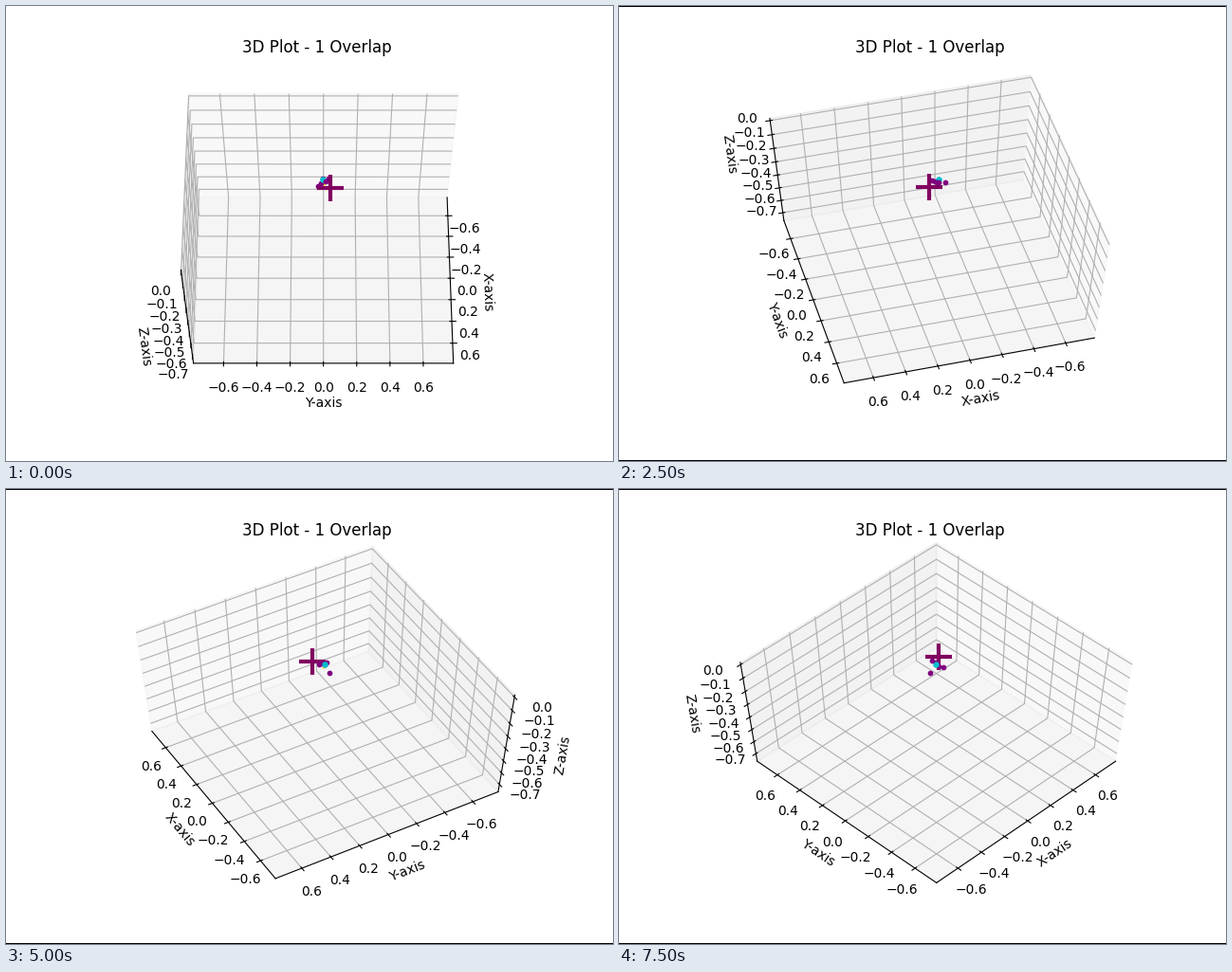
Recreate the animation shown at these times as a matplotlib script. Size 640 px wide and 480 px high, loop 8 s.

```python
import numpy as np
import matplotlib.pyplot as plt
from matplotlib.animation import FuncAnimation
from matplotlib.patches import Rectangle
from mpl_toolkits.mplot3d import Axes3D

W, H, DPI = 640, 480, 100
FRAMES, INTERVAL = 16, 500
STEP, ELEV = 15, 60
LIM, PAD = 0.75, 1 / 48
BORDER_FROM = 3

# x, y, z of the small markers
PURPLE_DOTS = [
    (-0.055, -0.006, -0.025),
    (0.020, -0.032, -0.014),
    (-0.005, 0.029, 0.016),
    (0.005, -0.012, -0.006),
    (0.004, 0.012, 0.008),
]
CYAN_DOT = (-0.012, -0.003, 0.008)
YELLOW_DOT = (0.0, 0.0, -0.012)
CROSS = (0.054, 0.039, 0.0)


class WideAxes3D(Axes3D):
    """3D axes that fill their whole slot instead of a centred square."""

    def apply_aspect(self, position=None):
        pass


def dot(pos, color, size=17, **style):
    ax.scatter(*[[v] for v in pos], c=color, s=size, depthshade=False,
               **{"linewidths": 0, **style})


fig = plt.figure(figsize=(W / DPI, H / DPI), dpi=DPI, facecolor="white")
ax = fig.add_subplot(111, axes_class=WideAxes3D)
ax.set_title("3D Plot - 1 Overlap")

for pos in PURPLE_DOTS:
    dot(pos, "purple")
dot(YELLOW_DOT, "gold", 8)
dot(CYAN_DOT, "#00bfcf", 22)
dot(CROSS, "#800060", 400, marker="+", linewidths=3)

side = LIM * (1 + 2 * PAD)
ax.set_xlim(-side, side)
ax.set_ylim(-side, side)
ax.set_zlim(-LIM * (1 + PAD), LIM * PAD)
ax.set_xticks(np.arange(-3, 4) / 5)
ax.set_yticks(np.arange(-3, 4) / 5)
ax.set_zticks(np.arange(-7, 1) / 10)
ax.set_xlabel("X-axis")
ax.set_ylabel("Y-axis")
ax.set_zlabel("Z-axis")
# Undo the default box scaling so the data box is a unit cube
ax.set_box_aspect((1, 1, 1), zoom=np.sqrt(3) / 1.8294640721620434)

borders = [Rectangle((0, y), W, 1, color="black", lw=0, antialiased=False,
                     transform=None) for y in (0, H - 1)]
for bar in borders:
    fig.add_artist(bar)


def update(i):
    # A tiny offset keeps the walls on a definite side at right angles
    ax.view_init(elev=ELEV, azim=max(STEP * i - 0.01, 0.01))
    for bar in borders:
        bar.set_visible(i >= BORDER_FROM)
    return []


anim = FuncAnimation(fig, update, frames=FRAMES, interval=INTERVAL,
                     init_func=lambda: update(0), repeat=True,
                     repeat_delay=0, blit=False)
plt.show()
```
